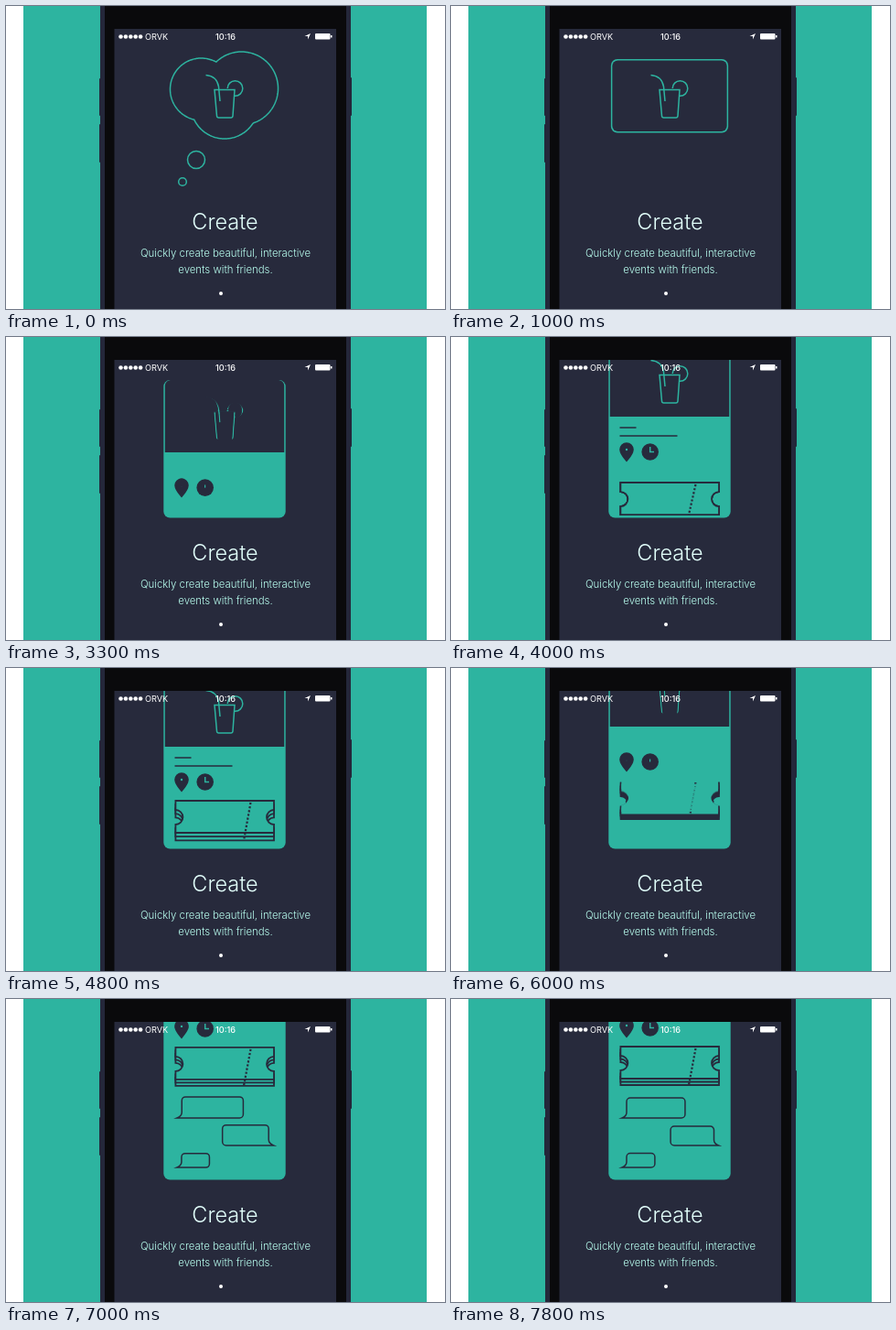
Animation of 480 by 331 pixels, one loop 8000 ms. Source, as an HTML page with a canvas:

```html
<!DOCTYPE html>
<html lang="en">
<head>
<meta charset="utf-8">
<style>
  html, body { margin: 0; width: 100%; height: 100%; overflow: hidden; background: #fff; }
  canvas, svg { position: absolute; left: 0; top: 0; }
  text { font-family: Inter, "Liberation Sans", sans-serif; fill: #fff; }
  .title { font-size: 23.5px; font-weight: 300; fill: #e2fffb; }
  .copy { font-size: 11.4px; font-weight: 300; fill: #b9fff0; }
  .status { font-size: 9.2px; }
</style>
</head>
<body>
<canvas width="480" height="331"></canvas>
<svg width="480" height="331" fill="#fff">
  <circle cx="125.5" cy="33.5" r="2.3"/><circle cx="130.9" cy="33.5" r="2.3"/>
  <circle cx="136.3" cy="33.5" r="2.3"/><circle cx="141.7" cy="33.5" r="2.3"/>
  <circle cx="147.1" cy="33.5" r="2.3"/>
  <text class="status" x="152" y="36.7">ORVK</text>
  <text class="status" x="240" y="36.7" text-anchor="middle" font-weight="500">10:16</text>
  <path d="M333 30l-6.500 3h3.500v3.500z"/>
  <rect x="338" y="30" width="16.500" height="6.500" rx="1"/>
  <rect x="355" y="32" width="1.500" height="2.500"/>
  <text class="title" x="239.5" y="243.500" text-anchor="middle">Create</text>
  <text class="copy" x="240" y="274" text-anchor="middle">Quickly create beautiful, interactive</text>
  <text class="copy" x="240" y="292" text-anchor="middle">events with friends.</text>
  <circle cx="235" cy="314" r="2"/>
</svg>
<script>
const TEAL = '#2db4a0', DARK = '#272a3c', BLACK = '#0a0a0c';
const stage = document.querySelector('canvas').getContext('2d');
const thin = Object.assign(document.createElement('canvas'), { width: 480, height: 331 }).getContext('2d');

const clamp = x => Math.max(0, Math.min(1, x));
const smooth = x => { x = clamp(x); return x * x * (3 - 2 * x); };
const sineOut = x => Math.sin(clamp(x) * Math.PI / 2);
// Damped spring from 0 to 1, starting at time `start` (ms)
const spring = (t, start, decay, freq) => {
  const s = (t - start) / 1000;
  return s <= 0 ? 0 : 1 - Math.exp(-decay * s) * Math.cos(freq * s);
};
const scrollAt = t => 51 * sineOut((t - 3170) / 950) + 93 * sineOut((t - 5800) / 1315);

function rect(c, color, x, y, w, h, r = 0) {
  c.fillStyle = color;
  c.beginPath();
  c.roundRect(x, y, w, h, r);
  c.fill();
}
function disc(c, color, x, y, r) {
  c.fillStyle = color;
  c.beginPath();
  c.arc(x, y, r, 0, 7);
  c.fill();
}
function line(c, color, ...points) {
  c.strokeStyle = color;
  c.beginPath();
  for (let i = 0; i < points.length; i += 2) c.lineTo(points[i], points[i + 1]);
  c.stroke();
}

function phone() {
  rect(stage, '#fff', 0, 0, 480, 331);
  rect(stage, TEAL, 19, 0, 441, 331);
  rect(stage, '#24273a', 102, 79, 4, 41, 1);
  rect(stage, '#24273a', 102, 129, 4, 42, 1);
  rect(stage, '#24273a', 374, 78, 4, 42, 1);
  rect(stage, '#24273a', 103, 0, 274, 331);
  rect(stage, BLACK, 108, 0, 264, 331);
  rect(stage, DARK, 118.5, 25, 242.500, 306);
}

const lobes = [[213.5, 91, 34], [257.5, 90, 40], [239, 108, 37]];
function cloudRadius(cos, sin) {
  return Math.max(...lobes.map(([x, y, r]) => {
    const dx = x - 239, dy = y - 97.5, along = dx * cos + dy * sin;
    return along + Math.sqrt(along * along - dx * dx - dy * dy + r * r);
  }));
}
function cloud(t) {
  const p = smooth((t - 150) / 800);
  stage.strokeStyle = TEAL;
  stage.beginPath();
  for (let i = 0; i < 360; i++) {
    const cos = Math.cos(i * Math.PI / 180), sin = Math.sin(i * Math.PI / 180);
    const box = (Math.abs(cos / 62.5) ** 12 + Math.abs(sin / 39) ** 12) ** (-1 / 12);
    const r = cloudRadius(cos, sin) * (1 - p) + box * p;
    stage.lineTo(239 + r * cos, 97.5 + r * sin);
  }
  stage.closePath();
  stage.stroke();
  [[208, 168, 9.5, 300], [193, 192, 4.3, 100]].forEach(([x, y, r, start]) => {
    const size = r * (1 - smooth((t - start) / 400));
    if (size < 0.3) return;
    stage.beginPath();
    stage.arc(x, y, size, 0, 7);
    stage.stroke();
  });
}

function drink(y) {
  thin.save();
  thin.translate(0, y);
  thin.strokeStyle = TEAL;
  thin.beginPath();
  thin.moveTo(218.5, 75.5);
  thin.bezierCurveTo(226, 76, 231, 80, 232.5, 88);
  thin.lineTo(234, 104);
  thin.moveTo(242.2, 90);
  thin.arc(250.5, 90, 8.3, Math.PI, Math.PI / 2 + 0.15);
  thin.moveTo(228, 91.5);
  thin.lineTo(250, 91.5);
  thin.lineTo(248, 120);
  thin.quadraticCurveTo(247.8, 122, 246, 122);
  thin.lineTo(232.5, 122);
  thin.quadraticCurveTo(230.7, 122, 230.5, 120);
  thin.closePath();
  thin.stroke();
  thin.restore();
}

// A stack of three tickets; the gaps between them fill up while it moves
function ticket(y, gap, moving) {
  thin.save();
  thin.lineWidth = 1.8;
  for (const layer of [2, 1, 0]) {
    const top = y + layer * gap;
    thin.beginPath();
    thin.moveTo(185.4, top);
    thin.lineTo(293, top);
    thin.arc(293, top + 18, 8, -Math.PI / 2, Math.PI / 2, true);
    thin.lineTo(293, top + 35);
    thin.lineTo(185.4, top + 35);
    thin.arc(185.4, top + 18, 8, Math.PI / 2, -Math.PI / 2, true);
    thin.closePath();
    thin.fillStyle = DARK;
    thin.globalCompositeOperation = moving && layer ? 'source-over' : 'destination-out';
    thin.fill();
    thin.globalCompositeOperation = 'source-over';
    thin.strokeStyle = DARK;
    thin.stroke();
  }
  thin.lineWidth = 2.2;
  thin.setLineDash([2.2, 2]);
  line(thin, DARK, 267.5, y + 2, 260, y + 35 + 2 * gap);
  thin.restore();
}

// Speech bubble growing out of its tail tip at (x, y)
function bubble(x, y, w, h, side, scale) {
  if (scale < 0.1) return;
  w *= scale;
  h *= scale;
  const r = 4 * Math.min(1, scale), left = 5 * scale;
  stage.save();
  stage.translate(x, y);
  stage.scale(side, 1);
  stage.strokeStyle = DARK;
  stage.beginPath();
  stage.moveTo(0, 0);
  stage.arcTo(w, 0, w, -h, r);
  stage.arcTo(w, -h, left, -h, r);
  stage.arcTo(left, -h, left, 0, r);
  stage.lineTo(left, -6 * scale);
  stage.quadraticCurveTo(left, -2 * scale, 0, 0);
  stage.closePath();
  stage.stroke();
  stage.restore();
}

function card(t, scroll, blur, moving) {
  const drop = spring(t, 1515, 4, 5);
  const half = 62.7 + 4 * spring(t, 950, 3.5, 14);
  const top = 58 - scroll, head = 137 - scroll, bottom = 138.5 + 59 * drop;
  const x = 239 - half, inset = Math.max(0, 1.5 - blur), flat = 6 * (1 - clamp(drop * 3));

  rect(stage, TEAL, x, top, 2 * half, bottom - top, 7);
  stage.clip();
  rect(stage, DARK, x + 1.5, top + inset, 2 * half - 3, head - top - inset, [6, 6, flat, flat]);
  if (!drop) return;

  const icons = head + (t > 1550 ? 45 * Math.exp(-(t - 1550) / 111) : 60);
  const grow = sineOut((t - 1530) / 270);
  if (grow) {
    line(thin, DARK, 184.5, head + 12, 184.5 + 18 * grow, head + 12);
    line(thin, DARK, 184.5, head + 21, 184.5 + 63 * grow, head + 21);
  }

  stage.fillStyle = DARK;
  stage.beginPath();
  stage.arc(192, icons + 36, 7.8, 2.75, 0.39);
  stage.quadraticCurveTo(197.7, icons + 43, 192, icons + 49.5);
  stage.quadraticCurveTo(186.3, icons + 43, 184.8, icons + 39);
  stage.fill();
  disc(stage, DARK, 217.7, icons + 38.5, 9.3);
  disc(thin, TEAL, 192, icons + 36, 1.2);
  line(thin, TEAL, 217.7, icons + 33, 217.7, icons + 38.5, moving ? 217.7 : 222, icons + 38.5);

  const rise = 60 * (1 - sineOut((t - 3600) / 700));
  ticket(head + 59 + rise, 3.5 * spring(t, 4400, 4, 8), moving);
  bubble(187, 130, 69, 22, 1, spring(t, 6400, 5, 5));
  bubble(292.5, 160, 52.5, 21, -1, spring(t, 6480, 5, 5));
  bubble(187, 184, 36, 15.5, 1, spring(t, 6700, 5, 5));
}

function draw(t) {
  const scroll = scrollAt(t);
  const speed = (scrollAt(t + 5) - scrollAt(t - 5)) * 100;
  const blur = 2.5 * clamp((speed - 66) / 15);

  phone();
  thin.clearRect(0, 0, 480, 331);
  stage.lineWidth = thin.lineWidth = 1.5;
  stage.save();
  stage.beginPath();
  stage.rect(118.5, 25, 242.500, 306);
  stage.clip();
  if (t < 950) cloud(t);
  else card(t, scroll, blur, speed > 40);
  drink(-scroll);
  // Fast scrolling wipes out thin horizontal strokes
  if (blur) {
    thin.globalCompositeOperation = 'destination-in';
    thin.drawImage(thin.canvas, 0, blur);
    thin.globalCompositeOperation = 'source-over';
  }
  stage.drawImage(thin.canvas, 0, 0);
  stage.restore();
}

function tick() {
  draw(Math.floor(performance.now() % 8000 / 100) * 100);
  requestAnimationFrame(tick);
}
tick();
</script>
</body>
</html>
```
